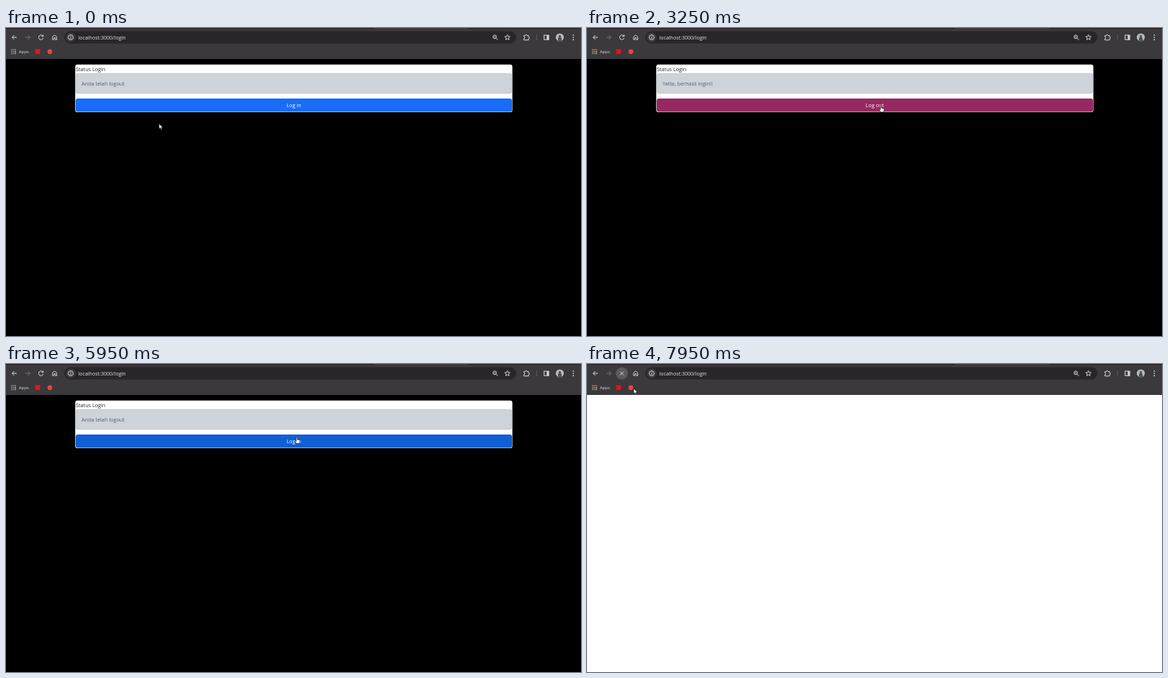
An HTML page for the animation above (8000 ms loop, 800 px wide and 428 px high).

```html
<!DOCTYPE html>
<html lang="id">
<head>
<meta charset="utf-8">
<title>Status Login</title>
<style>
  html, body { margin: 0; width: 100%; height: 100%; overflow: hidden; background: #000; }
  svg { display: block; width: 800px; height: 428px; }
  text { font: 7.25px "Open Sans", "Noto Sans", sans-serif; }
  .icon { fill: none; stroke: #dcdbde; stroke-width: 1; }
</style>
</head>
<body>
<svg viewBox="0 0 800 428">
  <rect width="800" height="428"/>
  <g id="card">
    <rect x="96.3" y="50.8" width="608.2" height="66.2" rx="3" fill="#fff"/>
    <text x="97" y="60" fill="#24292e">Status Login</text>
    <rect x="97.2" y="63.2" width="606.6" height="27.6" rx="3" fill="#cdd3d8" stroke="#b3bac1" stroke-width=".7"/>
    <text id="status" x="105" y="79.8" fill="#56616c"></text>
    <rect id="button" x="97" y="98" width="607" height="18.5" rx="3"/>
    <text id="label" x="400.5" y="110" fill="#fff" text-anchor="middle"></text>
  </g>
  <rect id="blank" y="43" width="800" height="385" fill="#fefdff"/>

  <g id="toolbar">
    <rect width="800" height="43" fill="#3b393b"/>
    <path d="M0 0H512V1H0ZM643 0H800V1H643Z" fill="#202022"/>
    <rect x="81" y="4.5" width="629" height="17" rx="8.5" fill="#282628"/>
    <circle id="halo" cx="48.5" cy="13" r="8.6" fill="#5b595c"/>
    <g class="icon">
      <path d="M15 13H8.5M11.5 10 8.5 13 11.5 16"/>
      <path d="M27 13H33.5M30.5 10 33.5 13 30.5 16" stroke="#777579"/>
      <path id="reload" d="M51.3 11.2A3.2 3.2 0 1 0 51.7 14M51.8 9.4V11.8H49.4"/>
      <path id="stop" d="M46 10.5 51 15.5M51 10.5 46 15.5"/>
      <path d="M64.8 16.2V12L67.7 9.8 70.6 12V16.2H68.7V13.6H66.7V16.2Z" stroke-width=".9"/>
      <circle cx="90" cy="13" r="6.8" fill="#3b393b" stroke="none"/>
      <circle cx="90" cy="13" r="3.4"/>
      <path d="M90 12.5V15M90 10.8V11.7"/>
      <circle cx="680" cy="12.3" r="2.4"/>
      <path d="M681.8 14.1 684.4 16.7M678.9 12.3H681.1"/>
      <path id="star" stroke-width=".9"/>
      <path d="M720.6 10.6H722.6A1.2 1.2 0 0 1 725 10.6H727V12.4A1.2 1.2 0 0 1 727 14.8V16.7H720.6V14.8A1.2 1.2 0 0 0 720.6 12.4Z"/>
      <path d="M738.2 9V17" stroke="#5d5b5f"/>
      <rect x="748.7" y="10" width="6.4" height="6.2"/>
      <path d="M753.6 10V16.2" stroke-width="2.6"/>
    </g>
    <circle cx="770.5" cy="13" r="5.6" fill="#b7bbbd"/>
    <path d="M767.7 17.9Q767.8 13.2 769.2 12.6A1.7 1.7 0 1 1 771.8 12.6Q773.2 13.2 773.3 17.9Q770.5 19.2 767.7 17.9Z" fill="#4c5549"/>
    <g id="dots" fill="#dcdbde"></g>
    <g id="apps"></g>
    <text x="100.5" y="15.8" fill="#e3e2e5" style="font-size:7.05px">localhost:3000/login</text>
    <text x="17.8" y="35" fill="#dcdbde" style="font-size:6px">Apps</text>
    <rect x="40.7" y="29.5" width="6.6" height="6.6" fill="#f00f18"/>
    <circle cx="61" cy="32.8" r="3.4" fill="#e5483b"/>
  </g>

  <g id="cursor" fill="#fff" stroke="#111" stroke-width=".6" stroke-linejoin="round">
    <path id="arrow" d="M0 0V7.2L1.7 5.7 2.8 8.2 4 7.7 2.9 5.3H5.1Z"/>
    <path id="hand" d="M-.7 .6Q0-.5 .7 .6V3.2L3.6 3.9Q4.6 4.2 4.4 5.4L3.6 8.8H-.2L-2.4 5.6Q-2.6 4.5-1.6 4.8L-.7 5.6Z"/>
  </g>
</svg>

<script>
const LOOP = 8000, STEP = 50, FADE = 150;
const $ = id => document.getElementById(id);

const BLUE = [23, 109, 248], BLUE_HOVER = [17, 95, 214];
const RED = [207, 31, 69], RED_HOVER = [185, 28, 66];

// time, x, y
const path = [
  [0, 213, 133], [350, 255, 160], [750, 269, 177], [950, 269, 177],
  [1300, 330, 239], [1600, 392, 112], [1800, 402, 107], [2300, 404, 106],
  [2450, 400, 94], [2650, 400, 94], [2850, 407, 128], [3050, 409, 108],
  [3450, 409, 108], [3700, 414, 150], [3950, 418, 200], [4450, 418, 200],
  [4900, 406, 103], [5200, 406, 103], [5250, 405, 102], [5900, 405, 102],
  [6120, 402, 100], [6250, 185, 50], [6700, 51, 17], [6900, 50, 14],
  [7700, 50, 14], [7950, 65, 34], [8000, 65, 34]
];

// time, button colour to fade to
const tints = [
  [-FADE, BLUE], [1560, BLUE_HOVER], [2450, BLUE], [2780, BLUE_HOVER],
  [3130, RED_HOVER], [3500, RED], [4880, RED_HOVER], [5060, BLUE_HOVER],
  [6000, RED_HOVER], [6200, RED]
];

const mix = (a, b, k) => a + (b - a) * k;
const clamp = k => Math.max(0, Math.min(1, k));
const show = (id, on) => $(id).setAttribute("visibility", on ? "visible" : "hidden");

function cursorAt(t) {
  const i = Math.max(1, path.findIndex(p => p[0] > t));
  const [t0, x0, y0] = path[i - 1], [t1, x1, y1] = path[i];
  const k = (t - t0) / (t1 - t0), e = k * k * (3 - 2 * k);
  return [mix(x0, x1, e), mix(y0, y1, e)];
}

function tintAt(t) {
  let color = BLUE;
  for (const [start, next] of tints) {
    const k = clamp((t - start) / FADE);
    color = color.map((c, i) => mix(c, next[i], k));
  }
  return `rgb(${color.map(Math.round)})`;
}

function draw(t) {
  const [x, y] = cursorAt(t);
  const onButton = x > 97 && x < 704 && y >= 98 && y < 117;
  const loggedIn = t >= 3130 && t < 5060 || t >= 6000;
  const loading = t >= 7600;

  $("cursor").setAttribute("transform", `translate(${x.toFixed(2)} ${y.toFixed(2)})`);
  show("hand", onButton);
  show("arrow", !onButton);
  $("button").setAttribute("fill", tintAt(t));
  $("status").textContent = loggedIn ? "Yatta, berhasil login!!" : "Anda telah logout";
  $("label").textContent = loggedIn ? "Log out" : "Log in";
  $("halo").setAttribute("opacity", clamp((t - 6700) / 200));
  show("reload", !loading);
  show("stop", loading);
  show("blank", t >= 7700);
}

function buildIcons() {
  const star = Array.from({ length: 10 }, (_, i) => {
    const r = i % 2 ? 1.7 : 4, a = (i / 5 - 0.5) * Math.PI;
    return `${697.6 + r * Math.cos(a)} ${13.2 + r * Math.sin(a)}`;
  });
  $("star").setAttribute("d", `M${star.join("L")}Z`);

  $("dots").innerHTML = [9.8, 13, 16.2]
    .map(y => `<circle cx="789.3" cy="${y}" r=".85"/>`).join("");

  const hues = ["#d96c60", "#d96c60", "#d96c60", "#65a875", "#6f9be0", "#d9b45a", "#65a875", "#65a875", "#d9b45a"];
  $("apps").innerHTML = hues.map((c, i) =>
    `<rect x="${7 + i % 3 * 2.6}" y="${29.3 + Math.floor(i / 3) * 2.6}" width="1.7" height="1.7" fill="${c}"/>`).join("");
}

buildIcons();
const began = performance.now();
function tick() {
  const t = (performance.now() - began) % LOOP;
  draw(Math.floor(t / STEP) * STEP);
  requestAnimationFrame(tick);
}
tick();
</script>
</body>
</html>
```
